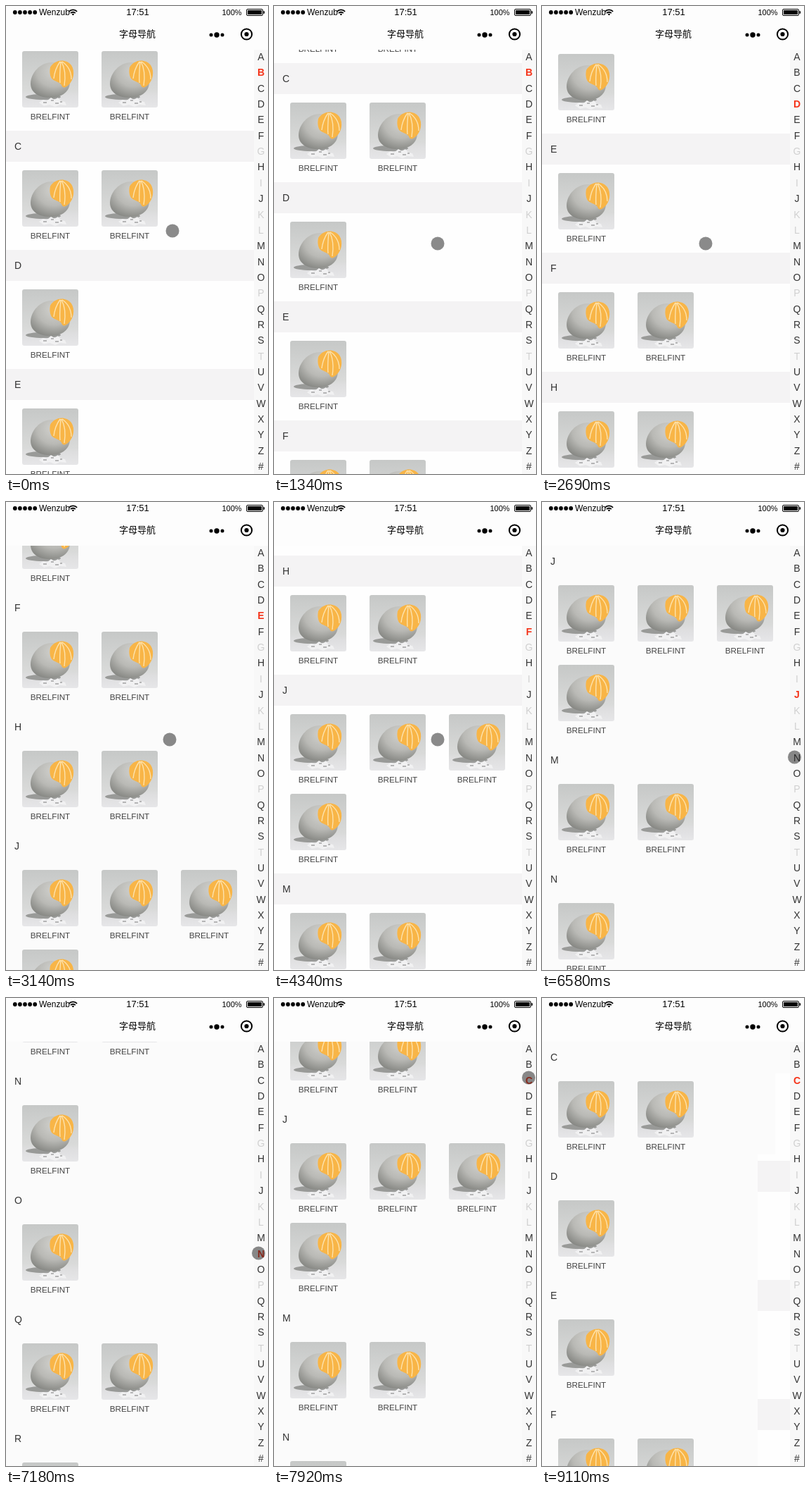
An HTML page that plays this animation: 373x664 px, repeating every 9480 ms.

```html
<!DOCTYPE html>
<html lang="zh">
<head>
<meta charset="utf-8">
<title>字母导航</title>
<style>
  html, body { margin: 0; width: 100%; height: 100%; overflow: hidden; background: #fdfdfd; }
  svg { display: block; width: 373px; height: 664px; font-family: "Liberation Sans", Arial, sans-serif; }
  .title { font: 13px "Noto Sans CJK SC", "Noto Sans CJK", sans-serif; }
  .head { font-size: 14px; fill: #333; }
  .label { font-size: 11.7px; fill: #444; text-anchor: middle; }
  .letter { font-size: 14px; fill: #333; text-anchor: middle; }
  .letter.off { fill: #d0d0d0; }
  .letter.on { fill: #f5341a; font-weight: bold; }
</style>
</head>
<body>
<svg viewBox="0 0 373 664">
  <defs>
    <linearGradient id="wall" x2="0" y2="1">
      <stop offset="0" stop-color="#c6c8c7"/>
      <stop offset=".7" stop-color="#d9dad9"/>
      <stop offset=".78" stop-color="#dededf"/>
      <stop offset="1" stop-color="#e6e6e8"/>
    </linearGradient>
    <radialGradient id="shell" cx=".6" cy=".25" r=".8">
      <stop offset="0" stop-color="#d2d2ce"/>
      <stop offset=".55" stop-color="#b9b9b5"/>
      <stop offset="1" stop-color="#858682"/>
    </radialGradient>
    <clipPath id="photo"><rect width="80" height="80" rx="3"/></clipPath>
    <clipPath id="page"><rect y="62" width="373" height="602"/></clipPath>
    <clipPath id="edge"><path d="M332 107h21v557h-46V222h25z"/></clipPath>
    <g id="item">
      <g clip-path="url(#photo)">
        <rect width="80" height="80" fill="url(#wall)"/>
        <ellipse cx="30" cy="65" rx="25" ry="4" fill="#999a98"/>
        <path d="M12 46C12 31 26 16 42 16C58 16 69 29 68 45C67 59 55 66 40 66C22 66 12 58 12 46Z" fill="url(#shell)"/>
        <path d="M40 23C46 12 62 10 70 20C76 29 73 42 66 48C61 53 57 52 56 48C52 43 46 43 42 39C39 34 39 28 40 23Z" fill="#f8b547"/>
        <path d="M54 15C49 22 46 30 45 39M55 15C54 26 53 36 54 45M56 15C61 24 62 36 60 49M57 15C66 21 70 30 70 40" fill="none" stroke="#fde2ac" stroke-width="1.4"/>
        <path d="M24 73l6-4 5 2 6-5 5 3 5-3 4 5 6 1 2 5-9-1-7 3-8-3-8 2z" fill="#f1f1f2"/>
        <path d="M30 73h5M41 70h4M47 74h5M54 72h3" stroke="#a3a3a3" stroke-width="1.5"/>
      </g>
      <text class="label" x="40" y="97">BRELFINT</text>
    </g>
  </defs>

  <rect width="373" height="664" fill="#fbfbfb"/>
  <g id="striped">
    <rect y="62" width="353" height="602" fill="#fefefe"/>
    <g id="bands" fill="#f4f3f4"></g>
  </g>
  <g clip-path="url(#page)"><g id="list"></g></g>
  <rect x="353" y="62" width="20" height="602" fill="#f8f8f8"/>
  <g id="index"></g>

  <rect width="373" height="62" fill="#fdfdfd"/>
  <g id="signal"></g>
  <text x="47" y="12.5" font-size="12">Wenzub</text>
  <g fill="none" stroke="#000" stroke-width="1.9">
    <path d="M89.7 7.8a8 8 0 0 1 11.4 0M92 10.2a4.8 4.8 0 0 1 6.8 0"/>
  </g>
  <path d="M93.6 11.6a2.6 2.6 0 0 1 3.6 0l-1.8 2z"/>
  <text x="187.5" y="12.5" font-size="13" text-anchor="middle">17:51</text>
  <text x="307.5" y="12.5" font-size="11">100%</text>
  <rect x="342.5" y="4.5" width="23" height="9" rx="1.5" fill="none" stroke="#000"/>
  <rect x="344" y="6" width="20" height="6"/>
  <path d="M366.5 7h.5a1.3 2 0 0 1 0 4h-.5z"/>
  <text class="title" x="187" y="44" text-anchor="middle">字母导航</text>
  <circle cx="292" cy="41" r="2.5"/><circle cx="300" cy="41" r="3.7"/><circle cx="308" cy="41" r="2.5"/>
  <circle cx="342.5" cy="40" r="7.6" fill="none" stroke="#000" stroke-width="2"/>
  <circle cx="342.5" cy="40" r="3.1"/>
  <circle id="cursor" r="9.5" fill="#1e1e1e" fill-opacity=".52"/>
</svg>
<script>
const LOOP = 9480, STEP = 150, TOP = 62;
const HEAD = 44, ROW = 113, COLUMN = 113;
const $ = id => document.getElementById(id);

function add(parent, tag, attrs, text) {
  const el = document.createElementNS("http://www.w3.org/2000/svg", tag);
  for (const key in attrs) el.setAttribute(key, attrs[key]);
  if (text) el.textContent = text;
  return parent.appendChild(el);
}

// Letter followed by its item count; positions are relative to section C.
const sections = "A2 B2 C2 D1 E1 F2 H2 J4 M2 N1 O1 Q2 R1 S2 U1".split(" ")
  .map(s => ({ letter: s[0], count: +s[1] }));
let y = -2 * (HEAD + ROW + 12);
for (const section of sections) {
  section.y = y;
  add($("bands"), "rect", { y, width: 353, height: HEAD });
  add($("list"), "text", { class: "head", x: 12, y: y + 27 }, section.letter);
  for (let i = 0; i < section.count; i++) {
    const left = 23 + (i % 3) * COLUMN;
    const top = y + HEAD + 12 + Math.floor(i / 3) * ROW;
    add($("list"), "use", { href: "#item", x: left, y: top });
  }
  y += HEAD + 12 + Math.ceil(section.count / 3) * ROW;
}

const letters = [..."ABCDEFGHIJKLMNOPQRSTUVWXYZ#"].map((letter, i) => ({
  letter,
  base: "GIKLPT".includes(letter) ? "letter off" : "letter",
  el: add($("index"), "text", { x: 363, y: 77 + i * 22.35 }, letter)
}));
for (let i = 0; i < 5; i++) add($("signal"), "circle", { cx: 12.8 + i * 7.1, cy: 9, r: 2.9 });

// Each wheel flick covers 238 px in four steps.
const flick = (start, from) => [
  [start - STEP, from], [start, from - 16], [start + 300, from - 221], [start + 450, from - 238]
];
const scroll = [
  [0, 177], [600, 125], [1050, 99],
  ...flick(1340, 97), ...flick(2690, -141), ...flick(4040, -379),
  [5240, -617], [5390, -690], [5540, -765], [5690, -783],
  [6730, -783], [6880, -850], [7030, -1050], [7180, -1200], [7330, -1234],
  [7770, -1234], [7920, -695], [8070, -80], [8220, 62]
];
const pointer = [
  [0, 237, 319], [1190, 233, 337], [4640, 233, 337], [5240, 363, 273],
  [5840, 363, 273], [6580, 359.5, 362], [7180, 359.5, 362], [7620, 362.5, 113],
  [8370, 362.5, 113], [8520, 342, 212], [8670, 317, 400], [8820, 325, 582],
  [8970, 337, 640], [9110, 345, 690]
];
const taps = [[5390, "J"], [6880, "N"], [7920, "C"]];

function at(track, t) {
  const next = track.findIndex(key => key[0] > t);
  if (next < 0) return track[track.length - 1].slice(1);
  const a = track[next - 1], b = track[next];
  const k = (t - a[0]) / (b[0] - a[0]);
  return a.slice(1).map((v, i) => v + (b[i + 1] - v) * k);
}

// The picture advances in 150 ms steps, counted anew from each anchor.
function snap(t) {
  const anchor = [9110, 7620, 6580, 1190, 0].find(a => a <= t);
  return anchor + Math.floor((t - anchor) / STEP) * STEP;
}

function activeLetter(t, offset) {
  const tap = taps.filter(([start]) => start <= t).pop();
  return tap ? tap[1] : sections.filter(s => s.y + offset <= TOP).pop().letter;
}

function draw(time) {
  const t = snap(time);
  const offset = Math.round(at(scroll, t)[0]);
  const [cx, cy] = at(pointer, t);
  const flat = (t >= 2990 && t < 4040) || (t >= 4490 && t < 8520);
  const active = activeLetter(t, offset);

  for (const id of ["list", "bands"]) $(id).setAttribute("transform", `translate(0 ${offset})`);
  $("striped").setAttribute("visibility", flat ? "hidden" : "visible");
  $("striped").setAttribute("clip-path", t >= 8520 ? "url(#edge)" : "url(#page)");
  $("cursor").setAttribute("cx", cx);
  $("cursor").setAttribute("cy", cy);
  for (const { letter, base, el } of letters)
    el.setAttribute("class", letter === active ? "letter on" : base);
}

const begin = performance.now();
function tick() {
  draw((performance.now() - begin) % LOOP);
  requestAnimationFrame(tick);
}
tick();
</script>
</body>
</html>
```
